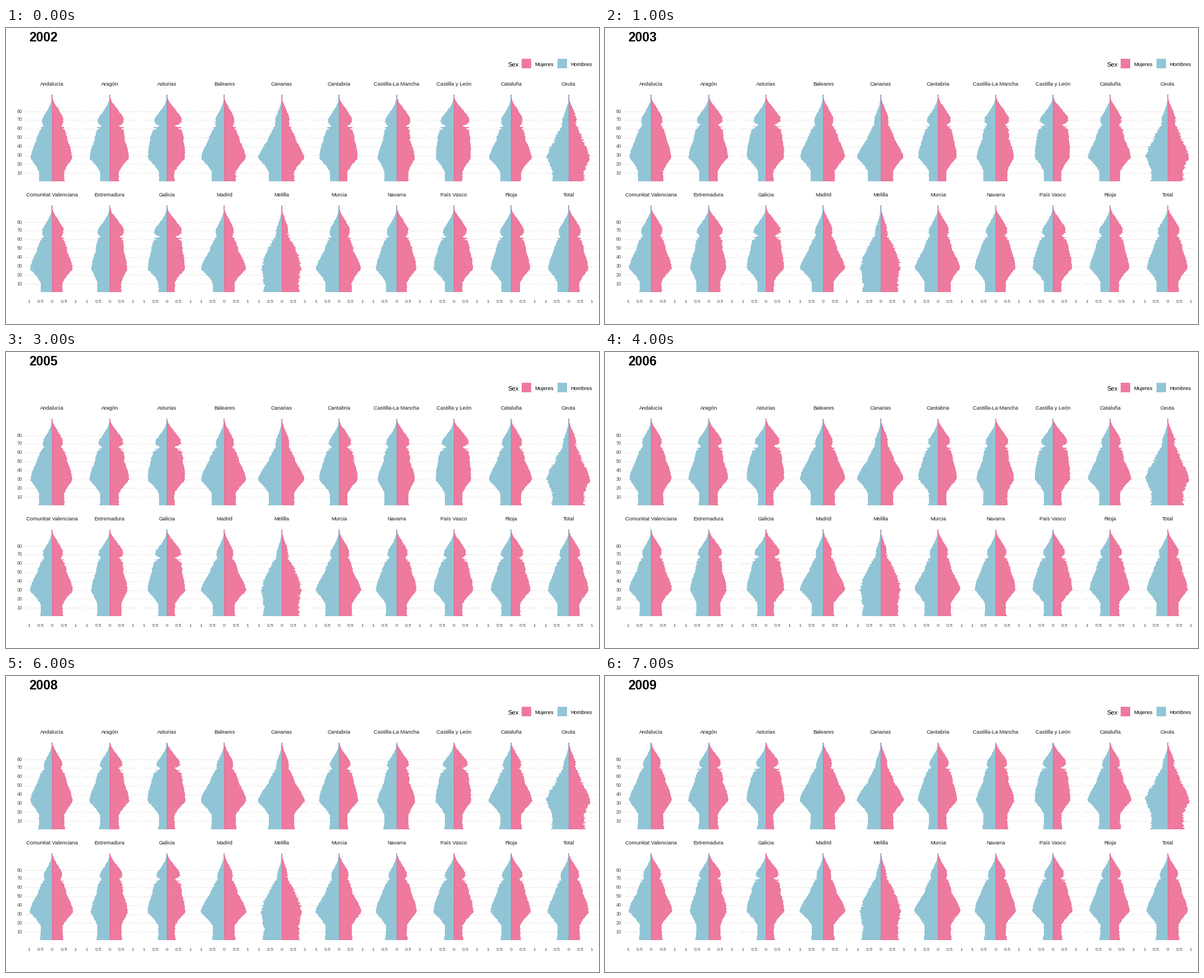
These frames come from a looping animation (1058 px wide and 529 px high, 8 s). A matplotlib script:

```python
import numpy as np
import matplotlib.pyplot as plt
from matplotlib.animation import FuncAnimation
from matplotlib.collections import LineCollection, PolyCollection
from matplotlib.patches import Rectangle

W, H, DPI = 1058, 529, 100
PX = 72 / DPI
START, YEARS = 2002, 8
UNIT, YEAR_H = 41.3, 1.579          # pixels per percent, pixels per year of age
LEFT, STEP = 82.45, 102.345
ROWS = (274.5, 472.5)               # height of age zero in each row
PINK, BLUE = (0.917, 0.348, 0.525), (0.461, 0.716, 0.799)
ALPHA = 0.8

AGES = np.arange(1, 99)
COHORTS = np.arange(-7, 99)         # age reached in the first year

# Half-width in pixels of the children, the young peak, the late forties
# and the seniors; the rest of each pyramid follows from these.
REGIONS = {
    "Andalucía": (23, 38, 28, 18),
    "Aragón": (17, 36, 27, 22),
    "Asturias": (14, 34, 30, 23),
    "Baleares": (22, 41, 28, 16),
    "Canarias": (23, 42, 25, 12),
    "Cantabria": (16, 35, 28, 20),
    "Castilla-La Mancha": (22, 34, 24, 21),
    "Castilla y León": (16, 32, 29, 24),
    "Cataluña": (19, 39, 26, 18),
    "Ceuta": (29, 39, 25, 12),
    "Comunitat Valenciana": (20, 39, 27, 18),
    "Extremadura": (22, 33, 25, 22),
    "Galicia": (15, 34, 28, 23),
    "Madrid": (20, 41, 26, 15),
    "Melilla": (32, 36, 26, 10),
    "Murcia": (24, 41, 26, 17),
    "Navarra": (19, 37, 28, 18),
    "País Vasco": (16, 36, 29, 20),
    "Rioja": (17, 36, 27, 20),
    "Total": (20, 37, 27, 18.5),
}
SMALL = ("Ceuta", "Melilla")        # few people, so uneven outlines

rng = np.random.default_rng(5)
RIPPLE = rng.normal(0, 0.5, COHORTS.size)
RIPPLE *= np.interp(COHORTS, [42, 50, 66, 74], [0.2, 1, 1, 0])
# Few births around the war years
NOTCH = np.interp(COHORTS, [58, 60, 61, 62, 63, 64, 65, 67],
                  [0, 0.5, 0.1, 0.7, 1, 0.8, 0.4, 0])
WOMEN_PER_MAN = np.interp(COHORTS, [0, 27, 47, 57, 70, 80, 90],
                          [0.95, 0.95, 0.99, 1.07, 1.18, 1.45, 2.1])
FADE = np.interp(COHORTS, [65, 85], [1, 0])


def base_curve(child, peak, mid, senior):
    """Width of the men of every cohort in the first year."""
    points = {
        -7: child + 2, 1: child, 11: child,
        18: child + 0.37 * (peak - child),
        26: peak, 29: 0.99 * peak,
        37: 0.55 * peak + 0.45 * mid + 1,
        47: mid, 57: (mid + senior) / 2 - 1,
        66: senior, 71: 0.97 * senior, 80: 0.5 * senior,
    }
    width = np.interp(COHORTS, list(points), list(points.values()))
    width = np.convolve(np.pad(width, 1, mode="edge"), [0.25, 0.5, 0.25], "valid")
    old = np.maximum(COHORTS - 80, 0)
    width *= np.exp(-0.09 * old - 0.0075 * old ** 2)
    return width * (1 - 0.27 * senior / child * NOTCH) + RIPPLE


def make_region(name, levels):
    men = base_curve(*levels)
    spread = 0.9 if name in SMALL else 0.25
    return {sex: width + rng.normal(0, spread, COHORTS.size) * FADE
            for sex, width in (("men", men), ("women", men * WOMEN_PER_MAN))}


regions = [make_region(*item) for item in REGIONS.items()]


def survival(age, rate, slope):
    return np.exp(-rate / slope * np.exp(slope * (age - 75)))


def widths(region, sex, years):
    """Half-widths at every age after some years have passed."""
    cohort = AGES - years
    hazard = (0.04, 0.09) if sex == "men" else (0.022, 0.105)
    trend = np.interp(cohort, [0, 10, 20, 27, 36, 46],
                      [0, 0.002, 0.009, 0.004, 0, -0.006])
    width = region[sex][cohort + 7] * (1 + years * trend)
    width = width * survival(AGES, *hazard) / survival(cohort, *hazard)
    return np.maximum(width, 1)


def place(i):
    return LEFT + STEP * (i % 10), ROWS[i // 10]


def outline(i, sex, years):
    """Stepped silhouette of one half; both halves share the centre column."""
    x, base = place(i)
    x = round(x)
    side, axis = (-1, x + 1) if sex == "men" else (1, x)
    edge = x + side * np.repeat(widths(regions[i], sex, years), 2)
    ages = np.repeat(AGES, 2) + np.tile([-0.5, 0.5], AGES.size)
    y = base - YEAR_H * ages
    return np.vstack([(axis, y[0]), np.column_stack([edge, y]), (axis, y[-1])])


fig = plt.figure(figsize=(W / DPI, H / DPI), dpi=DPI, facecolor="white")
ax = fig.add_axes([0, 0, 1, 1])
ax.set_xlim(0, W)
ax.set_ylim(H, 0)
ax.axis("off")


def label(x, y, text, size, color="#1a1a1a", ha="center", **style):
    return ax.text(x, y, text, fontsize=size * PX, color=color, ha=ha,
                   va="baseline", family="Liberation Sans", **style)


title = label(41, 24, "", 23, "black", "left", weight="bold")

label(895, 69, "Sex", 11.2, "black", "left")
for x, color, text in ((920, PINK, "Mujeres"), (984, BLUE, "Hombres")):
    ax.add_patch(Rectangle((x, 55), 17, 17, facecolor=color, alpha=ALPHA, lw=0))
    label(x + 23, 68, text, 9.5, "black", "left")

grid = []
for i, name in enumerate(REGIONS):
    x, base = place(i)
    label(x, base - 171.2, name, 9.5)
    for age in range(10, 90, 10):
        y = np.floor(base - YEAR_H * age) + 0.5
        grid.append([(x - 48.5, y), (x + 48.5, y)])
        if i % 10 == 0:
            label(29.5, y + 3, str(age), 8.7, "#4d4d4d", "right")
    if i < 10:
        for value in (-1, -0.5, 0, 0.5, 1):
            label(x + UNIT * value, 491.3, f"{abs(value):g}", 8.5, "#4d4d4d")
ax.add_collection(LineCollection(grid, colors="#ebebeb", linewidths=PX, zorder=1))

halves = {}
for sex, color in (("men", BLUE), ("women", PINK)):
    halves[sex] = PolyCollection([], facecolors=[color], edgecolors="none",
                                 alpha=ALPHA, antialiaseds=False, zorder=2)
    ax.add_collection(halves[sex])


def draw(frame):
    title.set_text(str(START + frame))
    for sex, shapes in halves.items():
        shapes.set_verts([outline(i, sex, frame) for i in range(len(regions))])
    return [title, *halves.values()]


anim = FuncAnimation(fig, draw, frames=YEARS, interval=1000, repeat=True,
                     repeat_delay=0, blit=False)
plt.show()
```
